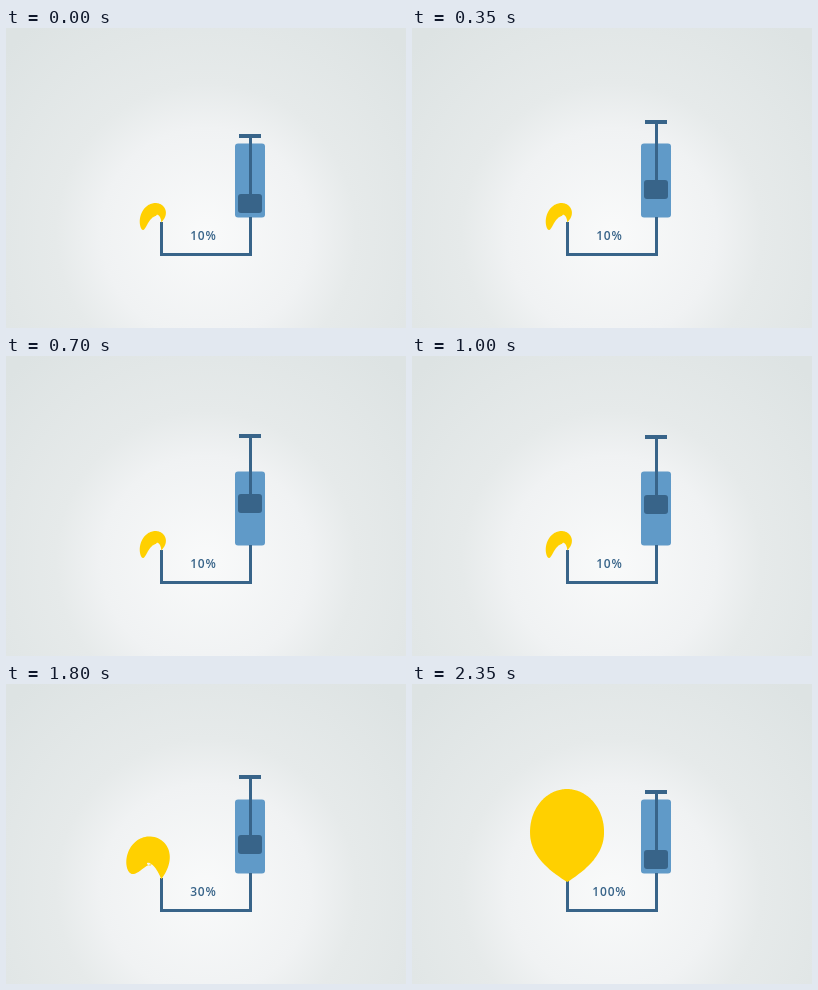
Write an HTML page that moves like this. It is 400 by 300 pixels and loops after 2.9 s.

```html
<!DOCTYPE html>
<html lang="en">
<head>
<meta charset="utf-8">
<title>Balloon pump</title>
<style>
  html, body { margin: 0; width: 100%; height: 100%; overflow: hidden; }
  body { background: radial-gradient(circle at 200px 205px, #f9fafa, #f0f2f3 105px, #e6eaea 150px, #dde3e3 270px); }
  svg { display: block; width: 100%; height: 100%; }
  text { font: 600 12px "Open Sans", "Noto Sans", sans-serif; letter-spacing: .8px; text-anchor: middle; }
</style>
</head>
<body>
<svg viewBox="0 0 400 300" fill="#386489">
  <rect x="229" y="115.5" width="30" height="74" rx="3" fill="#609ac8"/>
  <path d="M155.5 194V226.5H244.5V189" fill="none" stroke="#386489" stroke-width="3"/>
  <g id="plunger">
    <rect x="233" y="-2" width="22" height="4"/>
    <rect x="243" width="3" height="60"/>
    <rect x="232" y="58" width="24" height="19" rx="3"/>
  </g>
  <path id="balloon" fill="#ffd000"/>
  <text id="label" x="197.4" y="212"></text>
</svg>
<script>
const LOOP = 2900, STEP = 50;

// The balloon's spine is a cubic curve from the neck: two bends, a tip, and the widest radius
const poses = [
  { level: 10, bend: [162, 176], fold: [137, 176], tip: [137, 202], r: 6.5 },
  { level: 20, bend: [160, 176], fold: [128, 173], tip: [132, 208], r: 11.5 },
  { level: 30, bend: [160, 160], fold: [133, 157], tip: [126, 190], r: 14.5 },
  { level: 40, bend: [158, 152], fold: [136, 141], tip: [133, 186], r: 22 },
  { level: 100, bend: [155, 167], fold: [155, 136], tip: [155, 105], r: 37 }
];

const el = id => document.getElementById(id);
const mix = (a, b, f) => a + (b - a) * f;
const mixPoint = (p, q, f) => p.map((v, k) => mix(v, q[k], f));

// Egg profile: pointed at the neck, elliptical at the tip
const WIDEST = 0.54;
const profile = s => s < WIDEST
  ? 1 - (1 - s / WIDEST) ** 2.2
  : Math.sqrt(Math.max(0, 1 - ((s - WIDEST) / (1 - WIDEST)) ** 2));

function outline(level) {
  const i = Math.max(1, poses.findIndex(p => p.level >= level));
  const a = poses[i - 1], b = poses[i];
  const f = (level - a.level) / (b.level - a.level);
  const neck = [155.3, 194 + level / 25];
  const [bend, fold, tip] = ["bend", "fold", "tip"].map(k => mixPoint(a[k], b[k], f));
  const r = mix(a.r, b.r, f);
  const left = [], right = [];
  for (let n = 0; n <= 80; n++) {
    const s = Math.sin(n / 80 * Math.PI / 2);   // denser near the round tip
    const ab = mixPoint(neck, bend, s), bc = mixPoint(bend, fold, s), cd = mixPoint(fold, tip, s);
    const p = mixPoint(ab, bc, s), q = mixPoint(bc, cd, s);
    const [x, y] = mixPoint(p, q, s);
    const dx = q[0] - p[0], dy = q[1] - p[1];
    const w = r * profile(s) / Math.hypot(dx, dy);
    left.push([x + dy * w, y - dx * w]);
    right.unshift([x - dy * w, y + dx * w]);
  }
  return "M" + [...left, ...right].join("L") + "Z";
}

// Seven slow pushes, then three quick ones
function pushCount(t) {
  const slow = Math.floor((t - 800) / 200);
  const quick = Math.floor((t - 2200) / STEP);
  return Math.max(0, Math.min(7, slow)) + Math.max(0, Math.min(3, quick));
}

function draw(t) {
  const pulls = Math.min(15, Math.floor(t / STEP));
  const pushes = pushCount(t);
  const level = pushes <= 7 ? Math.max(10, 5 + 5 * pushes) : 40 + 20 * (pushes - 7);
  el("plunger").setAttribute("transform", `translate(0 ${108 - 2 * pulls + 3 * pushes})`);
  el("balloon").setAttribute("d", outline(level));
  el("label").textContent = level + "%";
}

const start = performance.now();
function tick() {
  draw((performance.now() - start) % LOOP);
  requestAnimationFrame(tick);
}
tick();
</script>
</body>
</html>
```
